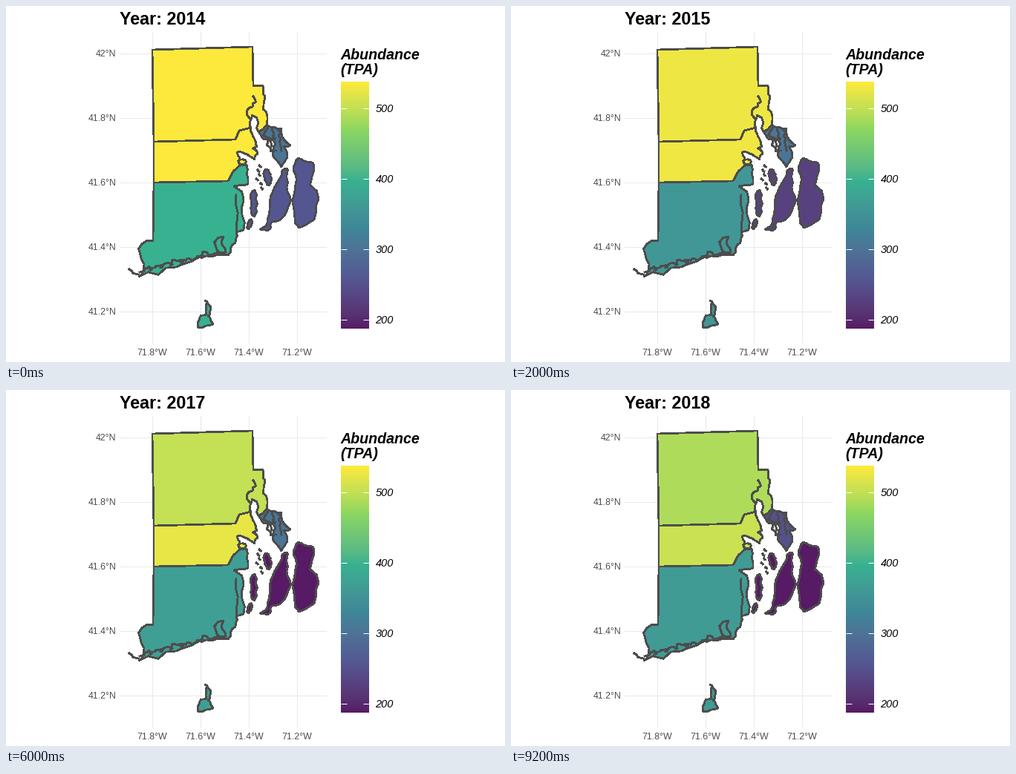
These frames come from a looping animation (672x480 px, 10000 ms). A matplotlib script:

```python
import matplotlib.pyplot as plt
from matplotlib.animation import FuncAnimation
from matplotlib.colors import to_rgb
import numpy as np

W, H, DPI = 672, 480, 100
PT = 72 / DPI
EDGE = "#4d4d4d"
LOW, HIGH = 187, 539
FIRST_YEAR = 2014

# Abundance per county, one value per year
ABUNDANCE = {
    "north": (539, 529, 518, 502, 489),
    "kent": (539, 531, 526, 524, 506),
    "south": (398, 356, 380, 370, 363),
    "newport": (256, 227, 223, 187, 187),
    "bristol": (303, 303, 303, 303, 249),
}

rng = np.random.default_rng(4)
plt.rcParams["font.family"] = "Liberation Sans"
fig = plt.figure(figsize=(W / DPI, H / DPI), dpi=DPI, facecolor="white")
ax = fig.add_axes([0, 0, 1, 1])
ax.axis("off")

# Colour scale: six stops blended in CIE Lab, then 90 % opaque on white
TO_XYZ = np.array([[.4124, .3576, .1805], [.2126, .7152, .0722],
                   [.0193, .1192, .9505]])
WHITE = TO_XYZ.sum(axis=1)
TO_LAB = np.array([[0, 116, 0], [500, -500, 0], [0, 200, -200]])


def to_lab(color):
    rgb = np.array(to_rgb(color))
    lin = np.where(rgb > .04045, ((rgb + .055) / 1.055) ** 2.4, rgb / 12.92)
    xyz = TO_XYZ @ lin / WHITE
    return TO_LAB @ np.where(xyz > .008856, np.cbrt(xyz),
                             7.787 * xyz + 16 / 116)


def from_lab(lab):
    f = np.linalg.solve(TO_LAB, lab)
    xyz = np.where(f > .2069, f ** 3, (f - 16 / 116) / 7.787)
    lin = np.clip(np.linalg.solve(TO_XYZ, xyz * WHITE), 0, 1)
    return np.where(lin > .0031308, 1.055 * lin ** (1 / 2.4) - .055,
                    12.92 * lin)


STOPS = np.array([to_lab(c) for c in (
    "#440154", "#414487", "#2a788e", "#22a884", "#7ad151", "#fde725")])


def shade(value):
    at = 5 * (value - LOW) / (HIGH - LOW)
    lab = [np.interp(at, range(6), channel) for channel in STOPS.T]
    return .9 * from_lab(lab) + .1


def label(x, y, text, px, **style):
    return ax.text(x, y, text, fontsize=px * PT, **style)


# Map drawing
shapes = {name: [] for name in ABUNDANCE}


def rough(pts, amp=.1, rounds=2):
    """Break each segment at its middle and push the break sideways."""
    pts = np.array(pts, float)
    for _ in range(rounds):
        step = np.diff(pts, axis=0)
        side = step[:, ::-1] * [1, -1] * rng.normal(0, amp, (len(step), 1))
        out = np.empty((2 * len(pts) - 1, 2))
        out[::2] = pts
        out[1::2] = pts[:-1] + step / 2 + side
        pts = out
    return pts


def land(county, border, shore):
    """Straight border closed by a rough shore."""
    coast = rough([border[-1], *shore, border[0]])
    patch, = ax.fill(*np.vstack([border, coast]).T, ec=EDGE, lw=1.7 * PT,
                     joinstyle="round", antialiased=False, zorder=3)
    shapes[county].append(patch)


def island(county, x, y, w, h, lean=0):
    """Rough ellipse; lean shifts its foot to the right."""
    a = np.linspace(0, 2 * np.pi, 10)[:-1]
    pts = np.c_[x + w / 2 * np.cos(a) + lean * np.sin(a),
                y + h / 2 * np.sin(a)]
    land(county, pts[:1], pts[1:])


def creek(*pts, amp=.25):
    ax.plot(*rough(pts, amp).T, color=EDGE, lw=1.8 * PT, antialiased=False,
            solid_joinstyle="round", zorder=4)


# Graticule
for i in range(4):
    x = 196.5 + 65 * i
    ax.plot([x, x], [35, 454], color="#ebebeb", lw=1.1 * PT, zorder=1)
    label(x, 471, f"{71.8 - .2 * i:.1f}°W", 12.4, color=EDGE, ha="center")
for i in range(5):
    y = 63.5 + 87 * i
    ax.plot([153, 431], [y, y], color="#ebebeb", lw=1.1 * PT, zorder=1)
    label(148.3, y + 4.5, f"{42 - .2 * i:.3g}°N", 12.4, color=EDGE, ha="right")

# Mainland, each county sharing its border points with the next
upper = [(330, 164), (314, 168), (309, 180), (199, 183)]
lower = [(316, 214), (306, 223), (299, 236), (199, 238)]
land("north", upper + [(197, 59), (332, 55), (333, 108), (346, 107)],
     [(349, 122), (346, 139), (351, 160), (341, 171), (331, 147), (328, 160)])
land("kent", lower + upper[::-1],
     [(334, 178), (338, 189), (332, 192), (339, 199), (335, 207), (325, 200),
      (311, 197)])
land("south", [(183, 321), (190, 316), (198, 317)] + lower[::-1],
     [(324, 214), (326, 240), (307, 243), (320, 263), (320, 302), (310, 306),
      (309, 319), (299, 336), (270, 337), (229, 352), (179, 365), (186, 348)])
island("kent", 318, 210, 11, 7)

# Block of land to the south
land("south", [(268, 397)],
     [(276, 406), (272, 418), (279, 429), (260, 434), (258, 428), (263, 417),
      (270, 416), (269, 405)])

# Eastern bay
land("bristol", [(341, 171)],
     [(351, 161), (371, 172), (383, 188), (374, 189), (379, 204), (371, 217),
      (359, 200), (363, 186), (358, 180), (346, 179)])
land("newport", [(394, 205)],
     [(413, 211), (412, 230), (417, 270), (415, 288), (394, 299), (389, 286),
      (390, 240), (387, 222)])
land("newport", [(372, 221)],
     [(379, 219), (378, 232), (382, 256), (376, 281), (358, 291), (356, 300),
      (342, 301), (352, 288), (356, 258), (369, 232)])
island("newport", 334, 266, 9, 36)
island("newport", 328, 294, 5, 13, -2)
island("newport", 352, 231, 9, 22, 2)

# Rivers, salt ponds and islets
creek((333, 122), (332, 136), (328, 151))
creek((310, 254), (310, 304), amp=.06)
creek((285, 332), (293, 311), (296, 332))
creek((166, 355), (178, 362))
for x in range(188, 290, 14):
    y = 357 - .23 * (x - 184)
    creek((x - 8, y + 3), (x, y - 3), (x + 8, y - 1))
for x in (352, 358, 365):
    creek((x, 165), (x + 5, 179), (x + 6, 195))
for y in np.linspace(216, 246, 6):
    x = 341 + rng.uniform(-4, 4)
    creek((x - 1, y - 1), (x + 1, y + 1))

# Colour bar
bar = [[shade(v)] for v in np.linspace(HIGH, LOW, 333)]
ax.imshow(bar, aspect="auto", extent=(451, 489, 435, 102),
          interpolation="nearest", zorder=2)
for value in range(200, 501, 100):
    y = 422.5 - (value - 200) * .948
    for x in (451, 481):
        ax.plot([x, x + 8], [y, y], color="white", lw=PT,
                solid_capstyle="butt", zorder=3)
    label(497.5, y + 5.2, str(value), 14.5, style="italic")
for y, text in ((72, "Abundance"), (92, "(TPA)")):
    label(450, y, text, 19.7, weight="bold", style="italic")

title = label(153, 25, "", 23.3, weight="bold")
ax.set_xlim(0, W)
ax.set_ylim(H, 0)


def draw(i):
    title.set_text(f"Year: {FIRST_YEAR + i}")
    for name, values in ABUNDANCE.items():
        for patch in shapes[name]:
            patch.set_facecolor(shade(values[i]))
    return [title]


anim = FuncAnimation(fig, draw, frames=5, interval=2000,
                     repeat=True, repeat_delay=0)
plt.show()
```
